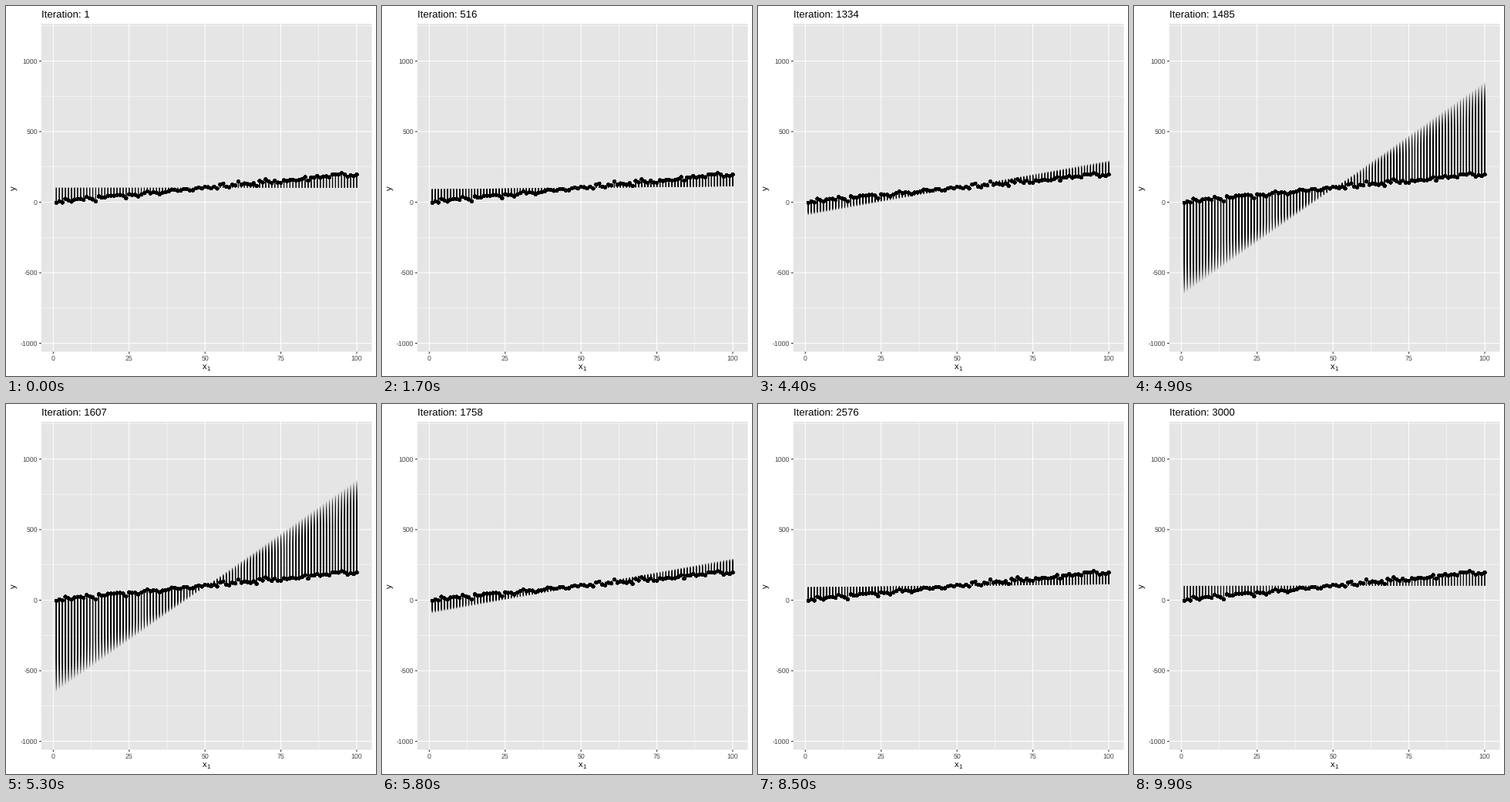
A matplotlib script that plays this animation: 480 px wide and 480 px high, repeating every 10 s.

```python
import math

import numpy as np
import matplotlib.pyplot as plt
from matplotlib.animation import FuncAnimation
from matplotlib.collections import LineCollection
from matplotlib.patches import Rectangle

plt.rcParams["font.family"] = "Liberation Sans"
plt.rcParams["text.hinting"] = "none"

SIZE, FRAMES, LAST_ITER = 480, 100, 3000
LEFT, RIGHT, TOP, BOTTOM = 45.8, 474.5, 23, 448.5
PEAK, COPIES = 51, 30
X_SCALE = (RIGHT - LEFT) / (99 * 1.1)


def px(v):
    return LEFT + (np.asarray(v) + 3.95) * X_SCALE


def py(v):
    return 254.5 - 0.1831 * np.asarray(v)


def rnorm(n, seed):
    """Normal deviates as R draws them: Mersenne Twister plus inversion."""
    state = []
    for _ in range(50 + 625):
        seed = (69069 * seed + 1) % 2 ** 32
        state.append(seed)
    rng = np.random.RandomState()
    rng.set_state(("MT19937", np.array(state[-624:], dtype=np.uint32), 624))
    u = rng.randint(0, 2 ** 32, size=2 * n, dtype=np.uint32) / 2 ** 32
    big = 2 ** 27
    p = (np.floor(big * u[::2]) + u[1::2]) / big
    z = np.linspace(-5, 5, 5001)
    cdf = [0.5 * (1 + math.erf(t / math.sqrt(2))) for t in z]
    return np.interp(p, cdf, z)


def slope(dist):
    """Fitted slope: a hyperbola rounded at its peak, fading out at the ends."""
    fade = np.clip(1 - dist / PEAK, 0, 1) ** 1.3
    return 30.5 * fade / (dist ** 2.5 + 1.43 ** 2.5) ** 0.4


x = np.arange(1, 101)
y = 2 * x + 10 * rnorm(100, seed=1)

fig = plt.figure(figsize=(SIZE / 72, SIZE / 72), dpi=72, facecolor="white")
ax = fig.add_axes([0, 0, 1, 1])
ax.set_xlim(0, SIZE)
ax.set_ylim(SIZE, 0)
ax.axis("off")


def stroke(xs, ys, color, width, z):
    ax.plot(xs, ys, color=color, lw=width, zorder=z, snap=False,
            solid_capstyle="butt")


def label(tx, ty, s, size, color="black", **kw):
    return ax.text(tx, ty, s, fontsize=size, color=color, **kw)


ax.add_patch(Rectangle((LEFT, TOP), RIGHT - LEFT, BOTTOM - TOP,
                       fc="#e5e5e5", ec="none", zorder=0, snap=False))

for v in np.arange(0, 101, 12.5):
    major = v % 25 == 0
    stroke([px(v)] * 2, [TOP, BOTTOM], "white", 1.07 if major else 0.53, 1 + major)
    if major:
        stroke([px(v)] * 2, [BOTTOM, BOTTOM + 2.75], "#333333", 1.07, 3)
        label(px(v), 460, f"{v:.0f}", 8.8, "#444444", ha="center")

for v in range(-1000, 1251, 250):
    major = v % 500 == 0
    stroke([LEFT, RIGHT], [py(v)] * 2, "white", 1.07 if major else 0.53, 1 + major)
    if major:
        stroke([LEFT - 2.75, LEFT], [py(v)] * 2, "#333333", 1.07, 3)
        label(40.8, py(v) + 3.1, str(v), 8.8, "#444444", ha="right")

label(255.1, 471, "x", 11)
label(260.6, 473, "1", 7.7)
label(11, 236, "y", 11, rotation=90, ha="center", va="center")
title = label(LEFT, 15, "", 13.2)

residuals = LineCollection([], colors=[(0, 0, 0, 0.2)], linewidths=1.07,
                           capstyle="butt", zorder=4)
residuals.set_snap(False)
ax.add_collection(residuals, autolim=False)

# stacked copies harden the dot edges
stack = COPIES // 2
ax.scatter(np.tile(px(x), stack), np.tile(py(y), stack), s=3.9 ** 2,
           linewidths=0.71, color=["black"] * (stack * len(x)),
           zorder=5, snap=False)


def draw(k):
    title.set_text(f"Iteration: {round(1 + (LAST_ITER - 1) * k / (FRAMES - 1))}")
    # overlay the fits of all iterations that round to this step
    steps = k + (np.arange(COPIES) + 0.5) / COPIES - 0.5
    steps = steps[(steps > 0) & (steps < FRAMES - 1)]
    fit = y.mean() + np.outer(slope(np.abs(steps - PEAK)), x - x.mean())
    seg = np.empty((*fit.shape, 2, 2))
    seg[..., 0] = px(x)[:, None]
    seg[..., 0, 1] = py(y)
    seg[..., 1, 1] = py(fit)
    residuals.set_segments(seg.reshape(-1, 2, 2))
    return title, residuals


anim = FuncAnimation(fig, draw, frames=FRAMES, interval=100, repeat=True,
                     repeat_delay=0, blit=False)
plt.show()
```
